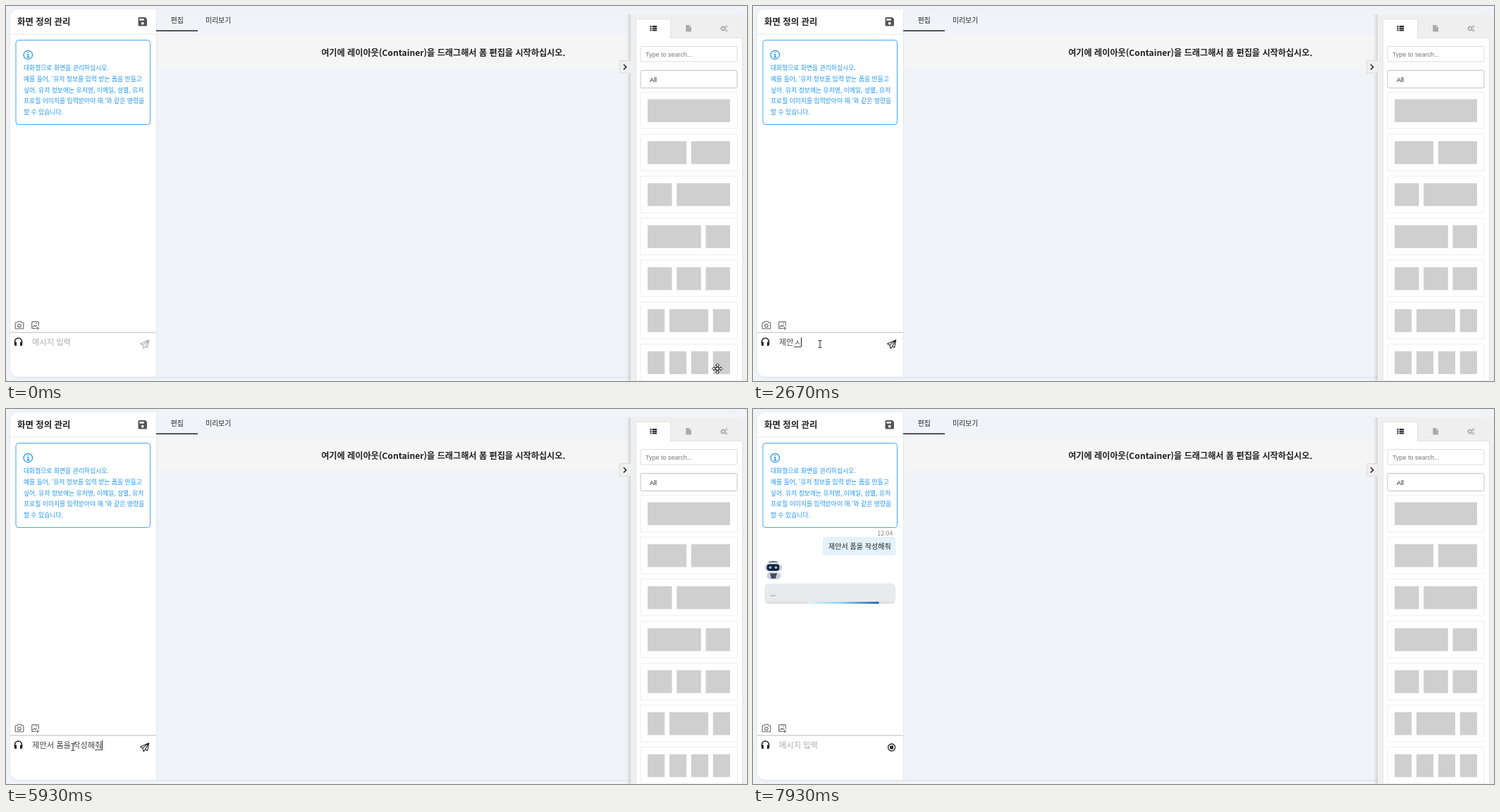
Animation of 1051x533 px, one loop 8000 ms. Source, as an HTML page:

```html
<!DOCTYPE html>
<html lang="ko">
<head>
<meta charset="utf-8">
<style>
  html, body { margin: 0; width: 100%; height: 100%; overflow: hidden; background: #f0f4f9; }
  svg { display: block; width: 1051px; height: 533px; }
  text { font-family: "Noto Sans CJK KR", "Noto Sans CJK", sans-serif; white-space: pre; }
  .latin { font: 9px "Liberation Sans", Arial, sans-serif; }
  .line { fill: none; stroke-linecap: round; stroke-linejoin: round; }
</style>
</head>
<body>
<svg viewBox="0 0 1051 533">
  <defs>
    <linearGradient id="glow">
      <stop offset="0" stop-color="#e0f5fb"/>
      <stop offset=".5" stop-color="#81d4fa"/>
      <stop offset="1" stop-color="#1565c0"/>
    </linearGradient>
    <linearGradient id="edge">
      <stop offset="0" stop-color="#000" stop-opacity="0"/>
      <stop offset="1" stop-color="#000" stop-opacity=".13"/>
    </linearGradient>
    <filter id="soft" x="-5%" y="-5%" width="110%" height="110%">
      <feDropShadow dx="0" dy="1" stdDeviation="1.5" flood-color="#000" flood-opacity=".09"/>
    </filter>
    <clipPath id="bubble"><rect x="16.3" y="248" width="186" height="28.7" rx="6"/></clipPath>
  </defs>

  <rect width="1051" height="533" fill="#f0f4f9"/>
  <rect x="6" y="5" width="1034" height="522" rx="12" fill="#f0f4f9" filter="url(#soft)"/>

  <!-- chat panel -->
  <path d="M213 5H18a12 12 0 0 0-12 12V515a12 12 0 0 0 12 12H213Z" fill="#fff"/>
  <path d="M6 40H213M213.5 5V527" stroke="#e6e8eb" fill="none"/>
  <text x="16" y="27.4" font-size="12.4" font-weight="700" fill="#222">화면 정의 관리</text>
  <path d="M189 16h8.5l2.5 2.5V27a1.5 1.5 0 0 1-1.5 1.5H189a1.5 1.5 0 0 1-1.5-1.5V17.500a1.500 1.500 0 0 1 1.500-1.500Z" fill="#555"/>
  <path d="M189.300 18h6.500v2.600h-6.500Z" fill="#fff"/>
  <circle cx="193.700" cy="24.700" r="1.900" fill="#fff"/>

  <rect x="14" y="48.500" width="190.500" height="120" rx="4" fill="#fff" stroke="#42a5f5"/>
  <circle cx="31.300" cy="69.500" r="6.200" fill="none" stroke="#2196f3" stroke-width="1.300"/>
  <path d="M29.800 68.800h1.700v4M29.600 72.800h3.800M31.200 65.600v1.500" fill="none" stroke="#2196f3" stroke-width="1.400"/>
  <g id="hint" font-size="8.8" fill="#2196f3"></g>

  <g class="line" stroke="#666" stroke-width="1.100">
    <path d="M14 450h2l1-1.800h4l1 1.800h2a.8.8 0 0 1 .8.800v7.200a.8.8 0 0 1-.8.800H14a.8.800 0 0 1-.8-.800v-7.200a.8.800 0 0 1 .8-.800Z"/>
    <circle cx="19" cy="454.300" r="2.300"/>
    <path d="M42 458.500h-4.500a.8.800 0 0 1-.8-.8v-8a.8.800 0 0 1 .8-.8h8a.8.800 0 0 1 .8.800v4.500M38 456.500l2.300-2.700 1.700 1.700 1.500-1.500M45 456v4M43 458h4"/>
    <path d="M42.500 451.300h1"/>
  </g>
  <path d="M6 464H213" stroke="#dcdcdc" stroke-width="2"/>
  <path d="M12.500 479v-2a5 5 0 0 1 10 0v2" fill="none" stroke="#222" stroke-width="1.500"/>
  <path d="M11.800 477.500h3.200v5.500h-1.500a1.700 1.700 0 0 1-1.700-1.700ZM23.200 477.500h-3.200v5.500h1.500a1.700 1.700 0 0 0 1.700-1.700Z" fill="#222"/>

  <g id="reply">
    <text x="176.300" y="179.500" font-size="8.800" fill="#888">12:04</text>
    <rect x="99" y="182" width="103.500" height="26" rx="4" fill="#e3f2fd"/>
    <text x="107" y="199" font-size="10.050" fill="#222">제안서 폼을 작성해줘</text>
    <g>
      <path d="M21 233h17l2 5-4 4H23l-4-4Z" fill="#c9d0da"/>
      <path d="M24 233h10l-2 8h-6Z" fill="#454d5e"/>
      <circle cx="39.500" cy="224" r="1" fill="#c6a5d6"/>
      <rect x="17" y="221" width="24" height="9" rx="4" fill="#c3cad6"/>
      <rect x="18.500" y="215.500" width="20" height="18" rx="7.500" fill="#dfe4eb"/>
      <path d="M21 218a9 4 0 0 1 15 0Z" fill="#4c566b"/>
      <rect x="19.500" y="220.500" width="18" height="9.500" rx="4" fill="#182136"/>
      <circle cx="24.500" cy="225.300" r="2" fill="#72b9f3"/>
      <circle cx="32.500" cy="225.300" r="2" fill="#72b9f3"/>
    </g>
    <g clip-path="url(#bubble)">
      <rect x="16" y="248" width="187" height="29" fill="#e8eaed"/>
      <text x="24" y="265.500" font-size="10" fill="#555">...</text>
      <rect x="16" y="274" width="187" height="3" fill="#dedfe1"/>
      <rect id="shortBar" y="274" height="3" fill="url(#glow)"/>
      <rect id="longBar" y="274" height="3" fill="url(#glow)"/>
    </g>
  </g>

  <text id="typed" x="37" y="482.200" font-size="11.250"></text>
  <path id="underline" stroke="#444"/>
  <path id="caret" stroke="#222"/>
  <path id="send" class="line" stroke-width="1.100" d="M202.700 474.700l-12.200 5.300 3.300 2.100 1.500 4.900 2.200-3.200 3.200 1.700ZM193.800 482.100l8.900-7.400-5.200 9.100"/>
  <g id="stop">
    <circle cx="196.600" cy="481" r="5" fill="none" stroke="#222" stroke-width="1.300"/>
    <rect x="194.200" y="478.600" width="4.800" height="4.800" rx=".7" fill="#222"/>
  </g>

  <!-- editor -->
  <g font-size="9.850" fill="#222">
    <text x="233.700" y="24.200">편집</text>
    <text x="283" y="24.200">미리보기</text>
  </g>
  <path d="M213 35.300H272" stroke="#222" stroke-width="1.500"/>
  <rect x="214" y="42" width="672" height="46" fill="#f5f5f5"/>
  <text x="620.300" y="71.200" text-anchor="middle" font-size="12.150" font-weight="700" fill="#222">여기에 레이아웃(Container)을 드래그해서 폼 편집을 시작하십시오.</text>

  <!-- component panel -->
  <rect x="880" y="12" width="6" height="521" fill="url(#edge)"/>
  <rect x="886" y="12" width="165" height="521" fill="#efefef"/>
  <path d="M887 77.500H870.500V95.500H887" fill="#efefef" stroke="#ddd"/>
  <path d="M876 83l3.700 3.700-3.700 3.700" fill="none" stroke="#333" stroke-width="1.700"/>
  <path d="M893.500 533V18.500H942.500V45.500H1044.500V533Z" fill="#fff" stroke="#e2e2e2"/>
  <path d="M913.500 29h2M913.500 31.800h2M913.500 34.600h2M916.700 29h6.500M916.700 31.800h6.500M916.700 34.600h6.500" stroke="#222" stroke-width="2"/>
  <path d="M964.300 27h4.700v3h3v6.500h-7.700ZM969.700 27l2.300 2.300h-2.300Z" fill="#aaa"/>
  <g fill="none" stroke="#aaa">
    <circle cx="1017" cy="32" r="2.300" stroke-width="1.600"/>
    <circle cx="1017" cy="32" r="3.400" stroke-width="1" stroke-dasharray="1.300 1.370"/>
    <circle cx="1021.700" cy="29.200" r="1.300"/>
    <circle cx="1021.700" cy="34.900" r="1.300"/>
  </g>
  <rect x="900" y="57.500" width="137" height="21.500" rx="2" fill="#fff" stroke="#ddd"/>
  <text class="latin" x="907" y="71.500" fill="#777">Type to search...</text>
  <rect x="900" y="91.500" width="137" height="25" rx="2" fill="#fff" stroke="#c4c4c4"/>
  <text class="latin" x="913" y="107.700" fill="#222">All</text>
  <g id="tiles"></g>

  <!-- pointers -->
  <g id="moveCursor" fill="#fff" stroke="#222" stroke-width=".9">
    <path d="M0-7.500l2.800 2.800H1V-1H4.700V-2.800L7.500 0 4.700 2.800V1H1V4.700H2.800L0 7.500-2.800 4.700H-1V1H-4.700V2.800L-7.500 0-4.700-2.800V-1H-1V-4.700H-2.800Z"/>
    <circle r="2.700" fill="none"/>
  </g>
  <path id="arrow" d="M0 0V11l2.600-2.400 1.700 4 1.800-.8-1.700-3.800H8Z" fill="#fff" stroke="#222" stroke-width=".8"/>
  <path id="beam" d="M-2.500-5h2q.5 0 .5.800 0-.8.500-.8h2M0-4.200V4.200M-2.500 5h2q.5 0 .5-.8 0 .8.500.8h2" fill="none" stroke="#222"/>
</svg>
<script>
const LOOP = 8000, SENT = 6330;
const $ = id => document.getElementById(id);
const show = (id, on) => $(id).setAttribute('display', on ? 'inline' : 'none');
const clamp = x => Math.min(1, Math.max(0, x));

$('hint').innerHTML = [
  '대화형으로 화면을 관리하십시오.',
  "예를 들어, '유저 정보를 입력 받는 폼을 만들고",
  '싶어. 유저 정보에는 유저명, 이메일, 성별, 유저',
  "프로필 이미지를 입력받아야 해.'와 같은 명령을",
  '할 수 있습니다.'
].map((line, i) => `<text x="25" y="${91.400 + i * 15.6}">${line}</text>`).join('');

// Each tile is a row of a 12-column grid.
const rows = [[12], [6, 6], [4, 8], [8, 4], [4, 4, 4], [3, 6, 3], [3, 3, 3, 3]];
const GAP = 6.7, UNIT = (117 + GAP) / 12;
$('tiles').innerHTML = rows.map((spans, i) => {
  const y = 122.500 + i * 59.7;
  let x = 910;
  return `<rect x="900" y="${y}" width="137" height="52" fill="#fff" stroke="#eee"/>` + spans.map(n => {
    const block = `<rect x="${x}" y="${y + 10}" width="${n * UNIT - GAP}" height="32.5" fill="#cfcfcf"/>`;
    x += n * UNIT;
    return block;
  }).join('');
}).join('');

const typing = [
  [1730, 'ㅈ'], [1870, '제'], [2000, '제ㅇ'], [2070, '제아'], [2200, '제안'],
  [2670, '제안ㅅ'], [2730, '제안서'], [2870, '제안서 '],
  [3070, '제안서 ㅍ'], [3130, '제안서 포'], [3330, '제안서 폼'],
  [3530, '제안서 폼ㅇ'], [3670, '제안서 폼으'], [3730, '제안서 폼을'], [4130, '제안서 폼을 '],
  [4270, '제안서 폼을 ㅈ'], [4330, '제안서 폼을 자'], [4470, '제안서 폼을 작'],
  [5200, '제안서 폼을 작ㅅ'], [5270, '제안서 폼을 작서'], [5330, '제안서 폼을 작성'],
  [5530, '제안서 폼을 작성ㅎ'], [5670, '제안서 폼을 작성해'],
  [5870, '제안서 폼을 작성해ㅈ'], [5930, '제안서 폼을 작성해줘'], [SENT, '']
];

// CSS "ease": cubic-bezier(.25, .1, .25, 1)
function ease(x) {
  if (x <= 0 || x >= 1) return clamp(x);
  let lo = 0, hi = 1;
  for (let i = 0; i < 24; i++) {
    const s = (lo + hi) / 2, bx = .75 * s * (1 - s) + s ** 3;
    bx < x ? lo = s : hi = s;
  }
  return .3 * lo * (1 - lo) ** 2 + 3 * lo * lo * (1 - lo) + lo ** 3;
}

function setBar(id, left, right) {
  const bar = $(id), width = 1.86;
  bar.setAttribute('x', 16.3 + left * width);
  bar.setAttribute('width', Math.max(0, (100 - left - right) * width));
}

function drawReply(t) {
  show('reply', t >= SENT);
  const age = t - 6287;
  const a = ease(age / 1320), b = ease((age - 1320) / 880);
  setBar('shortBar', -200 + 307 * a, 100 - 108 * a);
  setBar('longBar', -90 + 190 * b, 100 - 135 * b);
}

function drawInput(t) {
  const step = typing.filter(s => s[0] <= t).pop() || [930, ''];
  const value = step[1], typed = $('typed');
  typed.textContent = value || '메시지 입력';
  typed.setAttribute('fill', value ? '#444' : '#aaa');
  const end = value ? 37 + typed.getComputedTextLength() : 37;
  const composing = value && !value.endsWith(' ');
  show('underline', composing);
  $('underline').setAttribute('d', `M${end - 10.3} 484.500H${end}`);
  const sinceStep = t - step[0];
  show('caret', sinceStep >= 0 && Math.floor(sinceStep / 532) % 2 === 0);
  $('caret').setAttribute('d', `M${Math.floor(end) + .5} 471V484.500`);
  show('send', t < SENT);
  $('send').setAttribute('stroke', t < 1800 ? '#aaa' : '#222');
  show('stop', t >= SENT);
}

function drawPointer(t) {
  const p = clamp((t - 10) / 790), k = p * p * (3 - 2 * p);
  const x = 1009 - 914 * k;
  const y = 515 - 35 * k - 40 * Math.sin(Math.PI * k) + 55 * clamp((t - 7060) / 70 * .35) * 1 + Math.max(0, t - 7270) * .2;
  const kind = x > 886 ? 'moveCursor' : x > 205 ? 'arrow' : 'beam';
  for (const id of ['moveCursor', 'arrow', 'beam']) show(id, id === kind && t < 7400);
  $(kind).setAttribute('transform', `translate(${Math.round(x)} ${Math.round(y) + .5})`);
}

function draw(now) {
  const t = Math.floor((now % LOOP) * .015 + .1) / .015 + 4;
  drawReply(t);
  drawInput(t);
  drawPointer(t);
  requestAnimationFrame(later => draw(later - start));
}
const start = performance.now();
draw(0);
</script>
</body>
</html>
```
